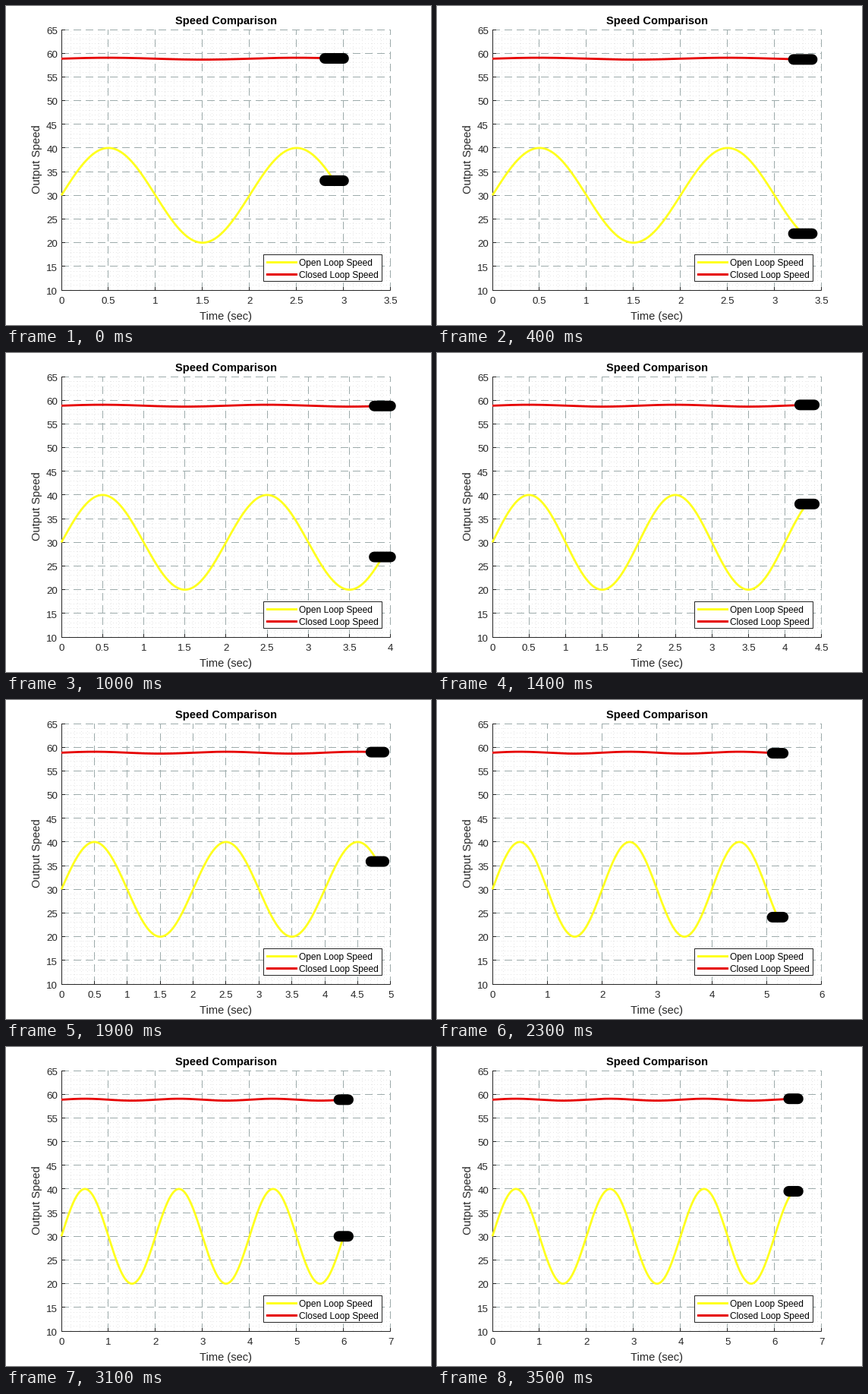
Recreate the animation shown at these times as a matplotlib script. Size 560 px wide and 420 px high, loop 3600 ms.

```python
import numpy as np
import matplotlib as mpl
import matplotlib.pyplot as plt
from matplotlib.animation import FuncAnimation
from matplotlib.collections import LineCollection
from matplotlib.patches import Rectangle

W, H, DPI = 560, 420, 100
PX = 72 / DPI                     # points per pixel
FRAMES, INTERVAL = 36, 100
LEFT, RIGHT, TOP, BOTTOM = 73, 506.8, 31, 374
Y_MIN, Y_MAX = 10, 65
INK, GRID, MINOR = "#262626", "#9dabab", "#e6e6e6"
YELLOW, RED = "#ffff1e", "#e60000"

mpl.rcParams["font.family"] = "Liberation Sans"

fig = plt.figure(figsize=(W / DPI, H / DPI), dpi=DPI, facecolor="white")
ax = fig.add_axes([0, 0, 1, 1])
ax.set_xlim(0, W)
ax.set_ylim(H, 0)
ax.axis("off")


def open_loop(t):
    return 30 + 10 * np.sin(np.pi * t)


def closed_loop(t):
    return 58.85 + 0.2 * np.sin(np.pi * t)


def to_x(t, x_max):
    return LEFT + (RIGHT - LEFT) * np.asarray(t) / x_max


def to_y(v):
    return BOTTOM - (BOTTOM - TOP) * (np.asarray(v) - Y_MIN) / (Y_MAX - Y_MIN)


def crisp(p):
    """Centre of the pixel that holds p."""
    return np.floor(np.asarray(p) + 1e-6) + 0.5


def text(x, y, s, size, **kw):
    kw = {"ha": "center", "va": "baseline", "color": INK, **kw}
    return ax.text(x, y, s, fontsize=size * PX, **kw)


def lines(color, style, z, segments=()):
    group = LineCollection(segments, colors=color, linewidths=PX,
                           linestyles=style, capstyle="butt", zorder=z,
                           snap=False)
    return ax.add_collection(group, autolim=False)


def across(values, x0=LEFT, x1=RIGHT):
    return [[(x0, y), (x1, y)] for y in crisp(to_y(values))]


def upright(xs, y0=BOTTOM, y1=TOP):
    return [[(x, y0), (x, y1)] for x in crisp(xs)]


def stroke(color, width, z, cap="butt", xs=(), ys=()):
    return ax.plot(xs, ys, color=color, lw=width * PX, zorder=z, snap=False,
                   solid_capstyle=cap, solid_joinstyle="round")[0]


DOTS, DASHES = (0, (1, 3)), (0, (10, 6))

# Fixed parts
y_ticks = np.arange(Y_MIN, Y_MAX + 1, 5)
y_minor = [v for v in range(Y_MIN, Y_MAX) if v % 5]
lines(MINOR, DOTS, 1, across(y_minor))
lines(GRID, DASHES, 2, across(y_ticks[1:]))
lines(INK, "solid", 3, across(y_ticks, x1=LEFT + 5))
lines(INK, "solid", 3, upright([LEFT], BOTTOM + 1) + across([Y_MIN]))
for v in y_ticks:
    text(68, to_y(v) + 5.8, str(v), 13.33, ha="right")

text(290, 24, "Speed Comparison", 14.67, weight="bold", color="black")
text(289.5, 413, "Time (sec)", 14.67)
text(48.5, 202, "Output Speed", 14.67, rotation=90, ha="right", va="center")

ax.add_patch(Rectangle((339.5, 327.5), 156, 35, fc="white", ec=INK,
                       lw=PX, zorder=8, snap=False))
for y, color, name in ((337.5, YELLOW, "Open Loop Speed"),
                       (353.5, RED, "Closed Loop Speed")):
    stroke(color, 3, 9, xs=[343, 384], ys=[y, y])
    text(386, y + 4.7, name, 12, ha="left", color="black", zorder=9)

# Moving parts
x_minor = lines(MINOR, DOTS, 1)
x_grid = lines(GRID, DASHES, 2)
x_marks = lines(INK, "solid", 3)
x_labels = [text(0, 392, "", 13.33) for _ in range(11)]
tracks = [(f, stroke(c, 2.8, 5), stroke("black", 14, 6, "round"))
          for f, c in ((open_loop, YELLOW), (closed_loop, RED))]


def axis_range(tenths):
    """Upper limit and tick step that hold the marker's leading edge."""
    edge = tenths + (tenths < 40)
    step = 5 if edge <= 50 else 10
    return -(-edge // step) * step / 10, step / 10


def update(i):
    now = (29 + i) / 10
    x_max, step = axis_range(30 + i)
    ticks = np.arange(round(x_max / step) + 1) * step
    xs = to_x(ticks, x_max)
    fine = [k * step / 5 for k in range(round(x_max / step) * 5) if k % 5]

    x_minor.set_segments(upright(to_x(fine, x_max)))
    x_grid.set_segments(upright(xs[1:]))
    x_marks.set_segments(upright(xs, y1=BOTTOM - 4))
    for k, label in enumerate(x_labels):
        shown = k < len(ticks)
        label.set_text(f"{ticks[k]:g}" if shown else "")
        label.set_x(xs[k] if shown else 0)

    t = np.linspace(0, now, 400)
    for f, curve, marker in tracks:
        curve.set_data(to_x(t, x_max), to_y(f(t)))
        marker.set_data(to_x([now - 0.1, now + 0.1], x_max),
                        [to_y(f(now))] * 2)
    return []


anim = FuncAnimation(fig, update, frames=FRAMES, interval=INTERVAL,
                     init_func=lambda: update(0), repeat=True,
                     repeat_delay=0, blit=False)
plt.show()
```
